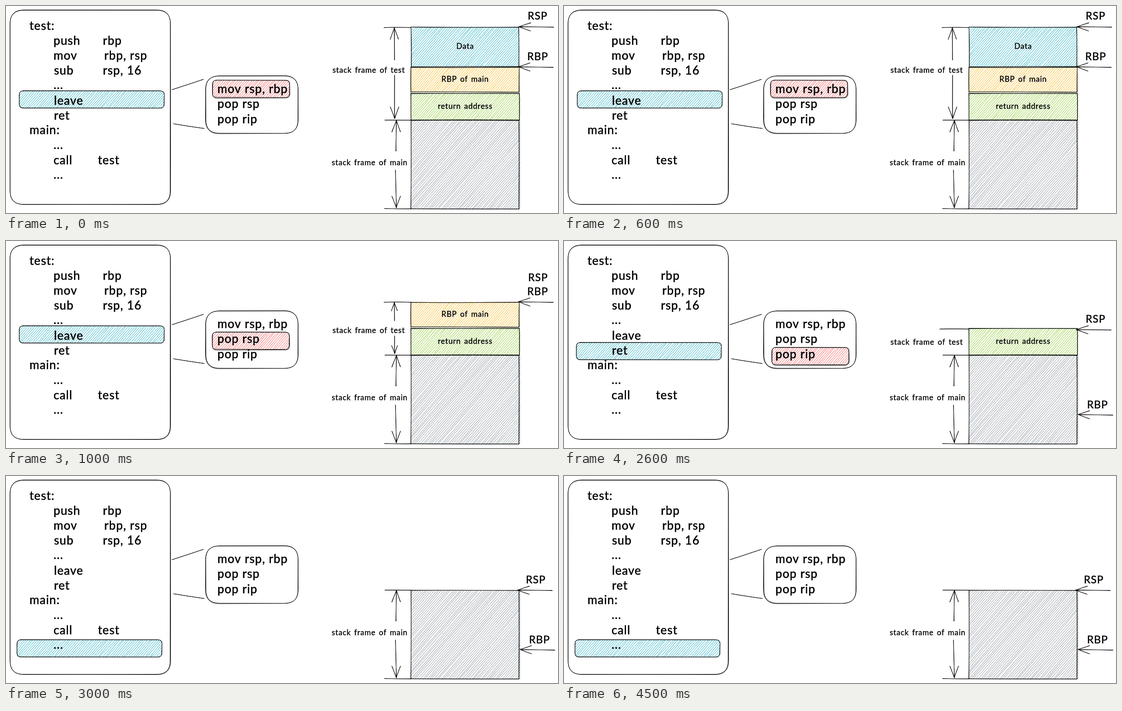
These frames come from a looping animation (1219x459 px, 5500 ms). An HTML page with a canvas:

```html
<!DOCTYPE html>
<html lang="en">
<head>
<meta charset="utf-8">
<title>leave and ret on the stack</title>
<style>
  html, body { margin: 0; width: 100%; height: 100%; overflow: hidden; background: #fff; }
  canvas { display: block; }
</style>
</head>
<body>
<canvas id="stage" width="1219" height="459"></canvas>
<script>
const ctx = document.getElementById('stage').getContext('2d');
const INK = '#000', BLUE = '#15aabf', RED = '#fa5252', AMBER = '#fab005',
      GREEN = '#82c91e', GRAY = '#868e96';
const LOOP = 5500, STEP_TIMES = [0, 1000, 2000, 3000];

// Seeded noise keeps each sketched shape the same on every redraw
let seed = 1;
function rand() {
  seed = (seed * 48271) % 2147483647;
  return seed / 2147483647;
}
const jit = (a) => (rand() * 2 - 1) * a;
const reseed = (n) => { seed = n * 7919 + 13; rand(); };

// A hand-drawn line: two slightly bowed passes
function line(x1, y1, x2, y2, wobble = 0.7) {
  const len = Math.hypot(x2 - x1, y2 - y1);
  const w = Math.min(wobble, len / 20);
  const bow = jit(len / 250);
  const nx = (y1 - y2) / len * bow, ny = (x2 - x1) / len * bow;
  ctx.beginPath();
  for (let pass = 0; pass < 2; pass++) {
    const k = pass ? 0.5 : 1;
    ctx.moveTo(x1 + jit(w), y1 + jit(w));
    ctx.bezierCurveTo(
      x1 + (x2 - x1) * 0.3 + nx * k + jit(w / 2), y1 + (y2 - y1) * 0.3 + ny * k + jit(w / 2),
      x1 + (x2 - x1) * 0.6 + nx * k + jit(w / 2), y1 + (y2 - y1) * 0.6 + ny * k + jit(w / 2),
      x2 + jit(w), y2 + jit(w));
  }
  ctx.stroke();
}

function pen(color, width) {
  ctx.strokeStyle = color;
  ctx.lineWidth = width;
}

function hatch(x0, y0, x1, y1, color) {
  const a = 49 * Math.PI / 180, c = Math.cos(a), s = Math.sin(a), gap = 3.9;
  pen(color, 0.65);
  for (let d = x0 * s + y0 * c + gap; d < x1 * s + y1 * c; d += gap) {
    const t0 = Math.max((x0 - d * s) / c, (d * c - y1) / s);
    const t1 = Math.min((x1 - d * s) / c, (d * c - y0) / s);
    if (t1 - t0 < 1) continue;
    line(d * s + t0 * c, d * c - t0 * s, d * s + t1 * c, d * c - t1 * s, 1.4);
  }
}

function box(id, x0, y0, x1, y1, color) {
  reseed(id);
  hatch(x0, y0, x1 + 1, y1, color);
  pen(INK, 0.95);
  line(x0, y0, x1, y0);
  line(x1, y0, x1, y1);
  line(x1, y1, x0, y1);
  line(x0, y1, x0, y0);
}

function roundBox(id, x, y, w, h, r, color) {
  reseed(id);
  if (color) {
    ctx.save();
    ctx.beginPath();
    ctx.roundRect(x, y, w, h, r);
    ctx.clip();
    hatch(x, y, x + w, y + h, color);
    ctx.restore();
  }
  pen(INK, 0.95);
  for (let pass = 0; pass < 2; pass++) {
    const l = x + jit(0.6), t = y + jit(0.6), rt = x + w + jit(0.6), b = y + h + jit(0.6);
    ctx.beginPath();
    ctx.moveTo(l + r, t);
    ctx.lineTo(rt - r, t + jit(0.7));
    ctx.quadraticCurveTo(rt, t, rt, t + r);
    ctx.lineTo(rt + jit(0.7), b - r);
    ctx.quadraticCurveTo(rt, b, rt - r, b);
    ctx.lineTo(l + r, b + jit(0.7));
    ctx.quadraticCurveTo(l, b, l, b - r);
    ctx.lineTo(l + jit(0.7), t + r);
    ctx.quadraticCurveTo(l, t, l + r, t);
    ctx.stroke();
  }
}

function stroke(id, x1, y1, x2, y2) {
  reseed(id);
  pen(INK, 0.95);
  line(x1, y1, x2, y2);
}

function arrow(id, x1, y1, x2, y2) {
  stroke(id, x1, y1, x2, y2);
  const size = Math.min(27, Math.hypot(x2 - x1, y2 - y1) * 0.48);
  const back = Math.atan2(y1 - y2, x1 - x2);
  for (const turn of [-0.35, 0.35])
    line(x2, y2, x2 + size * Math.cos(back + turn), y2 + size * Math.sin(back + turn));
}

// A thin outline gives the letters a marker-like weight
function text(str, x, y, size = 26, align = 'left') {
  ctx.font = `${size}px Lato, "Open Sans", sans-serif`;
  ctx.letterSpacing = size < 20 ? '0.8px' : '1.1px';
  ctx.wordSpacing = size < 20 ? '2px' : '0px';
  ctx.textAlign = align;
  ctx.fillStyle = INK;
  ctx.fillText(str, x, y);
  pen(INK, size / 45);
  ctx.strokeText(str, x, y);
}
const label = (str, x, y) => text(str, x, y, 17, 'center');

function register(id, name, x, y, tipX, tipY) {
  text(name, x, y, 23);
  arrow(id, tipX + 77, tipY + 1, tipX, tipY);
}

function code(step) {
  const [bx, by] = [[29, 188], [29, 188], [27, 225], [24, 363]][step];
  roundBox(1, 9, 9, 354.5, 431, 30);
  roundBox(2, bx, by, 320.5, 38.5, 9, BLUE);
  text('test:', 52, 53);
  text('push', 105, 86);
  text('rbp', 214, 86);
  text('mov', 105, 119);
  text('rbp, rsp', 217, 119);
  text('sub', 106, 152);
  text('rsp, 16', 214, 152);
  text('...', 105, 184);
  text('leave', 106, 219);
  text('ret', 106, 252);
  text('main:', 52, 284);
  text('...', 105, 317);
  text('call', 105, 351);
  text('test', 203, 351);
  text('...', 105, 383);
}

function detail(step) {
  stroke(3, 367, 185.5, 436, 163);
  stroke(4, 370, 261.5, 438, 272);
  roundBox(5, 441, 155, 203.5, 127, 30);
  const spot = [[456, 164.5], [455.5, 202], [459, 236]][step];
  if (spot) roundBox(6, ...spot, 170.5, 39, 9, RED);
  text('mov rsp, rbp', 467, 193);
  text('pop rsp', 467, 226);
  text('pop rip', 467, 260);
}

function stack(step) {
  reseed(10);
  hatch(1133, 254, 1136, 450, GRAY);
  box(11, 894.5, 253.5, 1133, 450, GRAY);
  if (step < 3) {
    box(12, 894.5, 194, 1134, 253, GREEN);
    label('return address', 1014, 228);
  }
  if (step < 2) {
    box(13, 894, 136, 1133, 191, AMBER);
    label('RBP of main', 1014, 168);
  }
  if (step < 1) {
    box(14, 895, 47, 1132.5, 134.5, BLUE);
    label('Data', 1014, 95);
  }
}

function measures(step) {
  stroke(20, 837, 252.5, 895, 253.5);
  stroke(21, 836, 449, 894, 450);
  arrow(22, 861, 322, 862, 254);
  arrow(23, 860.5, 364, 862, 447);
  label('stack frame of main', 803, 353);
  if (step === 3) return;
  const top = [47.5, 135.5, 195][step];
  const mid = [142, 198, 224][step];
  stroke(24, step === 2 ? 830 : 835, top, 894, top);
  label('stack frame of test', 801, mid + 5.5);
  if (step === 2) return;
  arrow(25, 858, step ? 177 : 120, 857.5, top + 1);
  arrow(26, 858, step ? 211 : 154, 858.5, 249);
}

function registers(step) {
  if (step === 0) register(30, 'RSP', 1152, 30, 1133, 46);
  if (step === 1) text('RSP', 1153, 89, 23);
  if (step === 2) register(30, 'RSP', 1152, 181, 1132, 196.5);
  if (step === 3) register(30, 'RSP', 1148, 238, 1130, 253);
  if (step < 2) register(31, 'RBP', 1151, 120, 1132, 135);
  else register(31, 'RBP', 1155, 371, 1135.5, 385);
}

function draw(step) {
  ctx.clearRect(0, 0, 1219, 459);
  ctx.lineCap = ctx.lineJoin = 'round';
  code(step);
  detail(step);
  stack(step);
  measures(step);
  registers(step);
}

let shown = -1;
function tick() {
  const t = performance.now() % LOOP;
  const step = STEP_TIMES.filter((start) => start <= t).length - 1;
  if (step !== shown) draw(shown = step);
  requestAnimationFrame(tick);
}
tick();
</script>
</body>
</html>
```
